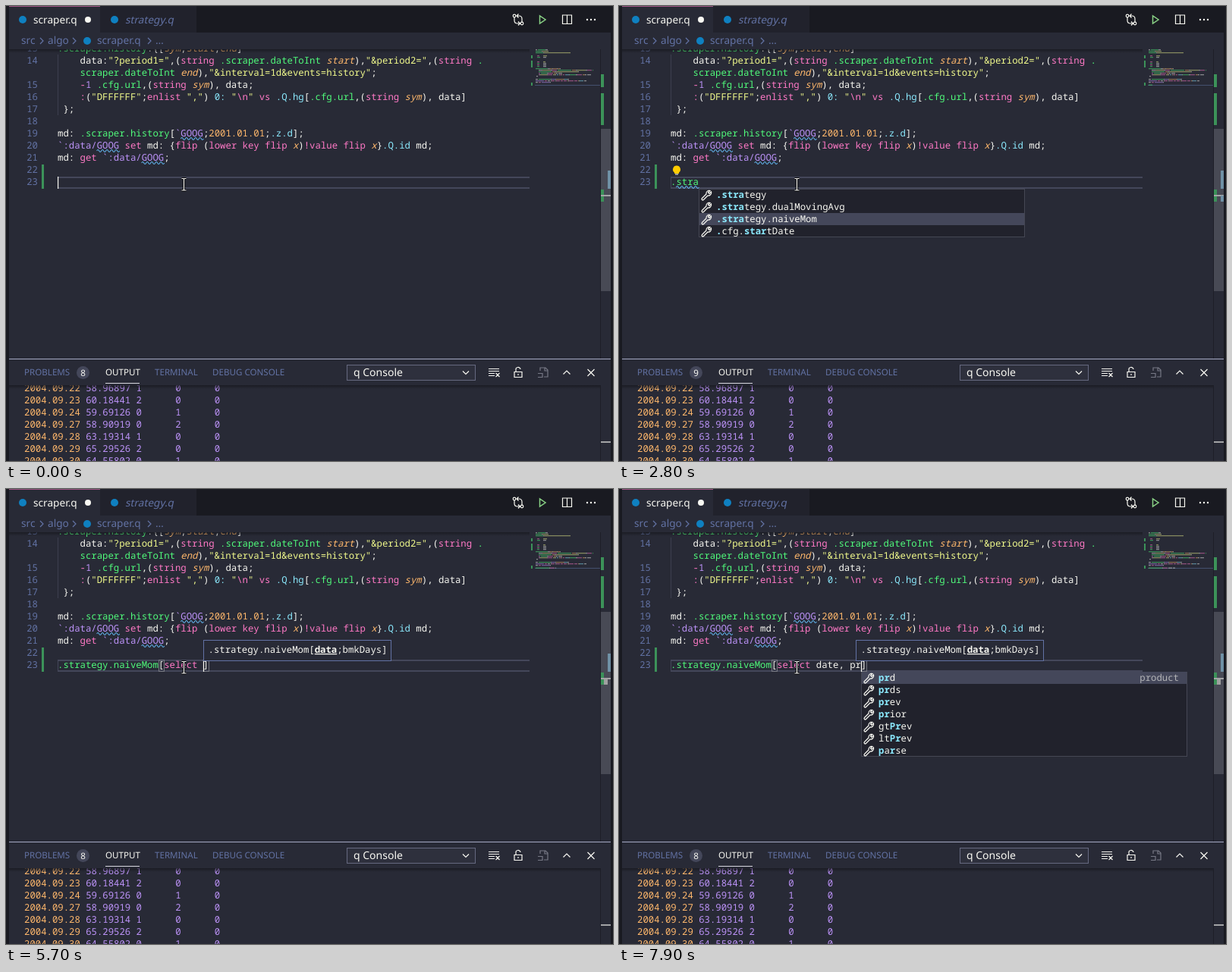
Animation of 800x600 px, one loop 8 s. Source, as an HTML page:

```html
<!DOCTYPE html>
<html lang="en">
<head>
<meta charset="utf-8">
<title>Code editor</title>
<style>
html, body { margin: 0; width: 100%; height: 100%; overflow: hidden; background: #282a36; }
svg { display: block; width: 800px; height: 600px; }
text { font: 500 12.3px "Noto Sans Mono", monospace; fill: #f8f8f2; white-space: pre; text-rendering: geometricPrecision; }
.ui { font: 13.65px "Noto Sans", sans-serif; }
.tab { font: 11.6px "Noto Sans", sans-serif; }
.y { fill: #f1fa8c; } .p { fill: #ff79c6; } .g { fill: #50fa7b; } .c { fill: #8be9fd; } .u { fill: #bd93f9; }
.o { fill: #ffb86c; font-style: italic; }
.d { fill: #ffb86c; }
.k { fill: #8be9fd; font-weight: 700; }
.b { font-weight: 700; text-decoration: underline; }
.dim { fill: #6272a4; }
.line { fill: none; stroke: #f8f8f2; stroke-width: 1.2; }
.wave { fill: none; stroke: #62b5ee; stroke-width: 1.1; }
</style>
</head>
<body>
<svg viewBox="0 0 800 600" xml:space="preserve">
  <defs>
    <linearGradient id="shade" x2="0" y2="1"><stop stop-color="#15161c"/><stop offset="1" stop-color="#15161c" stop-opacity="0"/></linearGradient>
    <clipPath id="codeArea"><rect y="57" width="800" height="408"/></clipPath>
    <clipPath id="outputArea"><rect y="500" width="800" height="100"/></clipPath>
    <path id="wrench" d="M1 11 6.500 5.500A4 4 0 0 1 11.500 1L9 3.500 10.500 5 13 2.500A4 4 0 0 1 8.500 7.500L3 13A1.400 1.400 0 0 1 1 11Z"/>
    <path id="pointer" d="M231.500 227.500h2q1 0 1 1 0-1 1-1h2M234.500 228v14M231.500 243h2q1 0 1-1 0 1 1 1h2" fill="none"/>
  </defs>
  <rect width="800" height="600" fill="#282a36"/>
  <rect width="800" height="35" fill="#191a21"/>
  <rect x="4" width="120" height="35" fill="#282a36"/>
  <rect x="4" width="120" height="1" fill="#a05584"/>
  <rect x="124" width="127" height="35" fill="#21222c"/>
  <g fill="#0f80c0"><circle cx="22" cy="18" r="5"/><circle cx="143" cy="18" r="5"/><circle cx="107" cy="46" r="5"/></g>
  <text class="ui" x="36" y="22.500">scraper.q</text>
  <circle cx="108" cy="18" r="4" fill="#f8f8f2"/>
  <text class="ui dim" transform="translate(157 22.500) skewX(-12)">strategy.q</text>
  <text class="ui dim" x="20" y="50">src</text>
  <text class="ui dim" x="55" y="50">algo</text>
  <text class="ui dim" x="120" y="50">scraper.q</text>
  <text class="ui dim" x="197" y="50">…</text>
  <path class="line" style="stroke:#6272a4" d="M45 42l4 4-4 4M88 42l4 4-4 4M187 42l4 4-4 4"/>
  <g class="line">
    <path d="M670 15v4q0 4 4 4h3M675 20.500l2.500 2.500-2.500 2.500M680 21v-4q0-4-4-4h-3M675.500 10.500l-2.500 2.500 2.500 2.500"/>
    <circle cx="670" cy="13" r="1.800"/><circle cx="680" cy="23" r="1.800"/>
    <path d="M703.500 13v10l7.500-5z" style="stroke:#89d185;stroke-width:1.500"/>
    <path d="M733.500 12h12v11.500h-12zM739.500 12v11.500"/>
  </g>
  <g fill="#f8f8f2"><circle cx="766" cy="18" r="1.200"/><circle cx="771" cy="18" r="1.200"/><circle cx="776" cy="18" r="1.200"/></g>

  <g id="code" clip-path="url(#codeArea)"></g>
  <rect x="4" y="57" width="686" height="5" fill="url(#shade)" opacity=".7"/>
  <rect x="47" y="209" width="3" height="32" fill="#3c9259"/>
  <g fill="#3c9259"><rect x="692" y="65" width="2" height="4"/><rect x="692" y="72" width="2" height="9"/><rect x="692" y="101" width="2" height="4"/></g>
  <rect x="783" y="162" width="14" height="214" fill="#484a55"/>
  <path d="M783.500 57V465M783.500 500V600" stroke="#1d1e27"/>
  <g fill="#3c9259"><rect x="784" y="90" width="4" height="17"/><rect x="784" y="115" width="4" height="42"/><rect x="784" y="242" width="4" height="16"/></g>
  <rect x="793" y="217" width="4" height="24" fill="#6f90a5"/>
  <path d="M784 250h13M784 575h13" stroke="#a3a4a6" stroke-width="2"/>

  <rect x="4" y="465" width="793" height="1" fill="#a5a8c4"/>
  <text class="tab dim" x="24" y="487">PROBLEMS</text>
  <text class="tab" x="131" y="487">OUTPUT</text>
  <text class="tab dim" x="196" y="487">TERMINAL</text>
  <text class="tab dim" x="272" y="487">DEBUG CONSOLE</text>
  <rect x="131" y="497" width="45" height="1" fill="#d8d8e0"/>
  <circle cx="101.500" cy="483.500" r="8.500" fill="#44475a"/>
  <rect x="449.500" y="473.500" width="169" height="20" fill="#2e303d" stroke="#666980"/>
  <text class="ui" style="font-size:14px" x="458" y="488">q Console</text>
  <g class="line">
    <path d="M602 481.500l4 4 4-4"/>
    <path d="M636 478.500h14M636 481.500h14M636 484.500h8M636 487.500h8M645.500 484l5 5M650.500 484l-5 5"/>
    <path d="M670 482.500h10v7h-10zM672 482v-2a3 3 0 0 1 6-1M675 485v2"/>
    <path d="M704 481v-4h7l3 3v9h-5M710 477v4h4M701 484.500h6v5h-6" style="stroke:#777986"/>
    <path d="M734.500 485.500l4.500-4.500 4.500 4.500M766.500 479l9 9M775.500 479l-9 9"/>
  </g>
  <g id="output" clip-path="url(#outputArea)"></g>
  <rect x="4" y="500" width="779" height="5" fill="url(#shade)" opacity=".7"/>
  <g id="live"></g>
  <use href="#pointer" stroke="#000" stroke-width="3"/>
  <use href="#pointer" stroke="#fff" stroke-width="1.200"/>
  <path d="M0 0h4v600h-4zM797 0h3v600h-3z" fill="#191a21"/>
</svg>
<script>
const CHAR = 7.38, LEFT = 68, LOOP = 8000;
const $ = id => document.getElementById(id);
const escape = s => s.replace(/&/g, '&amp;').replace(/</g, '&lt;');
const colX = n => LEFT + n * CHAR;
const rect = (x, y, w, h, attrs) => `<rect x="${x}" y="${y}" width="${w}" height="${h}" ${attrs}/>`;
const text = (x, y, body, attrs = '') => `<text x="${x}" y="${y}" ${attrs}>${body}</text>`;
const wave = (x, y, w) => `<path class="wave" d="M${x} ${y}q1.500-3 3 0${'t3 0'.repeat(Math.round(w / 3) - 1)}"/>`;

// Coloured runs: "~" followed by a colour class letter and the text.
const runs = s => s.split('~').slice(1).map(r => ({ kind: r[0], str: r.slice(1) }));
const spans = s => runs(s).map(r => `<tspan class="${r.kind}">${escape(r.str)}</tspan>`).join('');

const code = [
  [13, '~g.scraper.history~w:{[~osym~w;~ostart~w;~oend~w]'],
  [14, '~w    data:~y"?period1="~w,(~pstring ~g.scraper.dateToInt ~ostart~w),~y"&period2="~w,(~pstring ~g.'],
  ['', '~w    ~gscraper.dateToInt ~oend~w),~y"&interval=1d&events=history"~w;'],
  [15, '~w    ~p-~u1 ~g.cfg.url~w,(~pstring ~osym~w), data;'],
  [16, '~w    ~p:~w(~y"DFFFFFF"~w;~penlist ~y","~w) ~c0: ~y"~p\\n~y" ~pvs ~c.Q.hg~w[~g.cfg.url~w,(~pstring ~osym~w), data]'],
  [17, '~w };'],
  [18, ''],
  [19, '~wmd: ~g.scraper.history~w[~u`GOOG~w;~d2001.01.01~w;~c.z.d~w];'],
  [20, '~u`:data/GOOG ~pset ~wmd: {~pflip ~w(~plower key flip ~ox~w)~p!value flip ~ox~w}~c.Q.id ~wmd;'],
  [21, '~wmd: ~pget ~u`:data/GOOG~w;'],
  [22, ''],
  [23, '']
];

// One pixel per character, as in the overview beside the code.
function miniLine(line, y) {
  let col = 0, out = '';
  for (const { kind, str } of runs(line)) {
    for (const m of str.matchAll(/\S+/g))
      out += rect(698 + col + m.index, y, m[0].length, 1.3, `class="${kind}" fill="#f8f8f2" opacity=".45"`);
    col += str.length;
  }
  return out;
}

const miniHead = [
  '~w\\l ~g.algo.init~w[];', '~g.cfg.url~w:~y"query";', '~g.cfg.start~w:~y"download.history.table.event.data"',
  '', '~w  ~psym     ~ystart', '~w  ~g.cfg    ~wdate', '', '',
  '~w  ~pstr     ~yend', '~w  ~gint     ~wdate', '~w  ~psec     ~wtime', '~w  ~gday     ~wdate'
];

$('code').innerHTML =
  `<path d="M68.500 64V144" stroke="#3c3f4f"/>` +
  code.map(([num, line], i) => {
    const y = 60 + 16 * i;
    return text(42, y, num, 'class="dim" text-anchor="end"') + text(LEFT, y, spans(line)) + miniLine(line, 82 + 2 * i);
  }).join('') +
  miniHead.map((line, i) => miniLine(line, 57 + 2 * i)).join('') +
  wave(colX(22), 175, 29) + wave(colX(7), 191, 29) + wave(colX(15), 207, 29) +
  rect(697, 104, 86, 1, 'fill="#44506e"') +
  rect(LEFT, 225, 622, 2, 'fill="#44475a"') + rect(LEFT, 239, 622, 2, 'fill="#44475a"') + rect(LEFT, 225, 1, 16, 'fill="#44475a"');

$('output').innerHTML = [
  '22 58.96897 1      0', '23 60.18441 2      0', '24 59.69126 0      1', '27 58.90919 0      2',
  '28 63.19314 1      0', '29 65.29526 2      0', '30 64.55802 0      1'
].map((row, i) => text(24, 508 + 16 * i, spans(`~d2004.09.${row.slice(0, 2)}~u${row.slice(2)}      0`))).join('');

// Suggestions by number of typed characters; "*" toggles the matched letters.
const words = 'save scan scov sdev select set setenv show signum sin sqrt string date day delete deltas desc dev differ distinct div do dsave dict'.split(' ');
const dotted = '.strategy.naiveMom .algo.tradingSR .cfg.startDate .cfg.url .odbc.tables .Q.dpfts .Q.dsftg .Q.host .Q.sbt .Q.ts .scraper.dateToInt .scraper.history'.split(' ');
const lists = {
  1: dotted,
  2: '.strategy.naiveMom .scraper.dateToInt .scraper.history *.*cfg.*s*tartDate *.*Q.*s*bt *.*Q.t*s* *.*z.t*s* *.*Q.ho*s*t *.*Q.d*s*ftg *.*Q.dpft*s* *.*algo.trading*S*R *.*odbc.table*s*'.split(' '),
  3: '.strategy.naiveMom *.*cfg.*st*artDate *.*Q.*ts* *.*z.*ts* *.s*craper.date*T*oInt *.*Q.*s*b*t* *.s*craper.his*t*ory *.*Q.ho*st* *.*Q.d*s*f*t*g *.*Q.dpf*ts* *.*algo.*t*rading*S*R *.*odbc.*t*able*s*'.split(' '),
  4: '.strategy .strategy.dualMovingAvg .strategy.naiveMom *.*cfg.*st*a*r*tDate *.s*craper.his*t*o*r*y'.split(' '),
  5: '.strategy .strategy.dualMovingAvg .strategy.naiveMom *.*cfg.*star*tDate'.split(' '),
  33: 'prd prds prev prior parse peach pj gt*P*rev lt*P*rev ex*p*'.split(' '),
  34: 'prd prds prev prior gt*Pr*ev lt*Pr*ev *p*a*r*se'.split(' ')
};

function popup(n, typed) {
  const word = typed.match(n < 19 ? /\S*$/ : /\w*$/)[0];
  const items = lists[n] || (word && n > 18 ? words.filter(w => w.startsWith(word)) : []);
  if (!items.length) return '';
  const x = Math.round(colX(n)) + .5, height = items.length * 16, selected = n === 4 || n === 5 ? 2 : 0;
  let out = rect(x, 241.5, 429, height - 1, 'fill="#21222c" stroke="#454754"');
  out += rect(x + .5, 241 + 16 * selected, 428, 16, 'fill="#44475a"');
  items.forEach((item, i) => {
    const marked = item.includes('*') ? item : `*${word}*${item.slice(word.length)}`;
    const label = marked.split('*').map((part, j) => `~${j % 2 ? 'k' : 'w'}${part}`).join('');
    const y = 241 + 16 * i;
    out += `<use href="#wrench" class="line" x="${x + 3}" y="${y + 1.5}"/>` + text(x + 22.5, y + 12, spans(label));
    if (item === 'prd') out += text(x + 418.5, y + 12, 'product', 'text-anchor="end" style="fill:#b4b5b8"');
  });
  if (items.length === 12) out += rect(x + 418.5, n === 3 ? 268 : 242, 10, 153, 'fill="#4a4c57"');
  return out;
}

function signature(n) {
  const x = Math.round(colX(n)) + .5;
  return rect(x, 199.5, 247, 27, 'fill="#282a36" stroke="#6272a4"') +
    text(x + 6, 216, spans('~w.strategy.naiveMom[~bdata~w;bmkDays]'));
}

const bulb = '<path d="M76 210.500a5 5 0 0 1 3 9v1.500h-6v-1.500a5 5 0 0 1 3-9z" fill="#ffcc00"/><path d="M74 222h4" stroke="#b9bac0" stroke-width="1.500"/>';
const script = '.strategy.naiveMom[select date, pr';

// time, typed characters, caret shown, signature column, extras (e: ninth problem, b: bulb)
const steps = [
  [0, 0, 1], [100, 0, 0], [400, 1, 1], [600, 2, 1], [700, 3, 1], [900, 4, 1], [1000, 5, 1],
  [1100, 5, 1, 0, 'e'], [1400, 5, 1, 0, 'eb'], [1500, 5, 0, 0, 'eb'], [2000, 5, 1, 0, 'eb'], [2800, 5, 0, 0, 'eb'],
  [2900, 18, 1, 0, 'e'], [3000, 18, 1], [3400, 18, 0], [3900, 18, 1], [4400, 19, 1], [4500, 19, 1, 19],
  [4800, 20, 1, 19], [4900, 21, 1, 20], [5000, 22, 1, 21], [5100, 23, 1, 22, 'e'], [5200, 24, 1, 24, 'e'],
  [5400, 25, 1, 24, 'e'], [5500, 26, 1, 25, 'e'], [5600, 26, 1, 26, 'e'], [5700, 26, 1, 26],
  [6000, 27, 1, 26], [6100, 28, 1, 27], [6200, 29, 1, 28], [6300, 30, 1, 30], [6400, 31, 1, 31],
  [6800, 31, 0, 31], [7300, 31, 1, 31], [7400, 32, 1, 31], [7500, 32, 1, 32], [7800, 33, 1, 32], [7900, 34, 1, 33]
];

function draw([, n, caret, sigCol = 0, extras = '']) {
  const typed = script.slice(0, n), inCall = n > 18, problem = extras.includes('e');
  const line = !inCall ? `~${n > 1 ? 'g' : 'w'}${typed}`
    : `~g${typed.slice(0, 18)}~w[~${n > 24 ? 'p' : 'w'}${typed.slice(19, 25)}~w${typed.slice(25)}]`;
  const bracket = col => rect(Math.round(colX(col)) + .5, 225.5, 7, 15, 'fill="none" stroke="#74767f"');
  let out = text(LEFT, 236, spans(line)) + miniLine(line, 103.5);
  if (inCall) out += bracket(18) + bracket(n) + rect(788, 250, 5, 8, 'fill="#a0a0a0"');
  if (problem) out += rect(793, 250, 4, 8, 'fill="#6f90a5"');
  if (problem && n === 5) out += wave(colX(1), 239, 29);
  if (extras.includes('b')) out += bulb;
  if (caret) out += rect(colX(n), 225, 1.2, 16, 'fill="#f8f8f2"');
  if (sigCol) out += signature(sigCol);
  out += popup(n, typed);
  out += text(101.5, 487.5, problem ? 9 : 8, 'class="tab" text-anchor="middle"');
  $('live').innerHTML = out;
}

let shown;
function frame() {
  const time = performance.now() % LOOP;
  const step = steps.findLast(s => s[0] <= time);
  if (step !== shown) draw(shown = step);
  requestAnimationFrame(frame);
}
frame();
</script>
</body>
</html>
```
